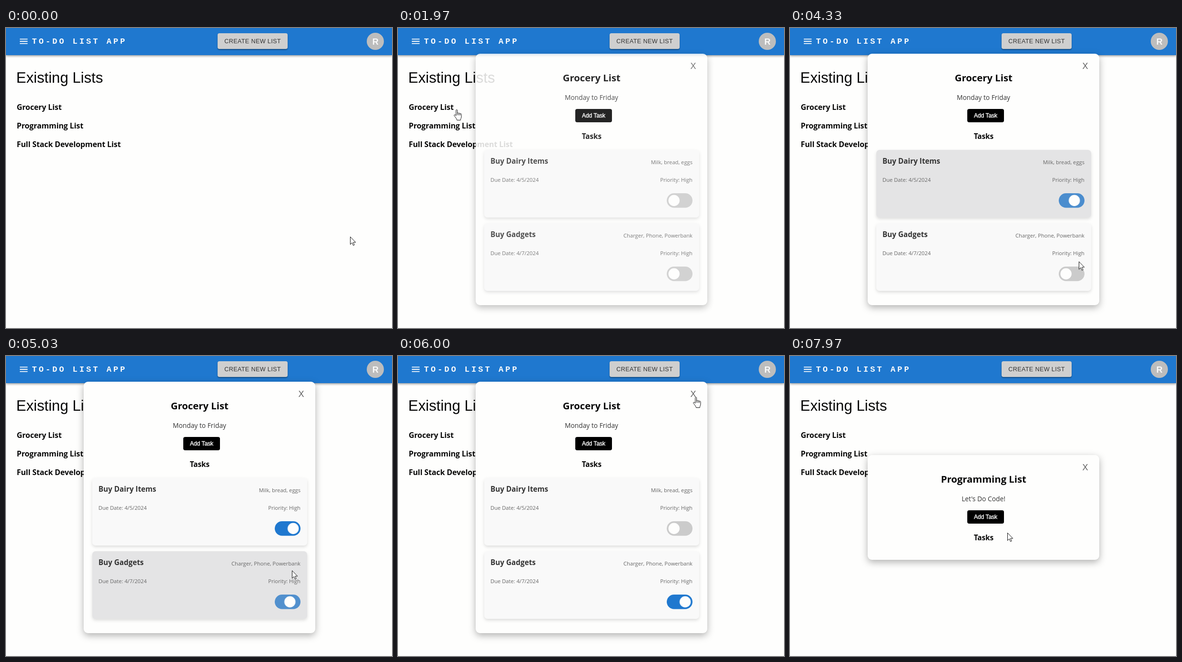
Write an HTML page that moves like this. It is 810 px wide and 630 px high and loops after 8 s.

```html
<!DOCTYPE html>
<html lang="en">
<head>
<meta charset="utf-8">
<title>To-do list app</title>
<style>
  :root { --page: #fefefd; --blue: #1f78cf; --off: #cbcbcb; --card: #f9f9f9; --hover: #e4e4e5; }
  html, body { margin: 0; width: 100%; height: 100%; overflow: hidden; background: var(--page); }
  svg { display: block; }
  text { font-family: "Open Sans", "Noto Sans", sans-serif; fill: #080808; }
  .arial { font-family: "Liberation Sans", Arial, sans-serif; }
  .brand { font: 700 17px "Liberation Mono", monospace; letter-spacing: 4.02px; fill: #fcfcfc; }
  .item { font-weight: 700; font-size: 16px; letter-spacing: -.1px; }
  .title { font-weight: 700; font-size: 20.3px; }
  .note { font-size: 13.8px; fill: #333; }
  .name { font-weight: 700; font-size: 15.3px; fill: #333; }
  .small { font-size: 11.2px; fill: #666; }
  .mid { text-anchor: middle; }
  .end { text-anchor: end; }

  .bar { fill: var(--blue); filter: drop-shadow(0 2px 2px rgba(0, 0, 0, .38)); }
  .create { fill: #cfcfcf; filter: drop-shadow(0 2px 1px rgba(0, 0, 0, .35)); }
  .panel { fill: var(--page); filter: drop-shadow(0 5px 7.5px rgba(0, 0, 0, .3)); }
  .card { fill: var(--card); filter: drop-shadow(0 3px 3px rgba(0, 0, 0, .13)); }
  .track { fill: var(--off); }
  .knob { fill: var(--page); }

  .run, .card, .track, .knob { animation: 8s linear infinite; }
  .modal1 { animation-name: modal1; }
  .modal2 { animation-name: modal2; }
  .one .card { animation-name: hover1; }
  .two .card { animation-name: hover2; }
  .one .track { animation-name: track1; }
  .two .track { animation-name: track2; }
  .one .knob { animation-name: knob1; }
  .two .knob { animation-name: knob2; }
  .cursor { animation-name: move; animation-timing-function: ease-in-out; }
  .arrow { animation-name: arrow; animation-timing-function: step-end; }
  .hand { animation-name: hand; animation-timing-function: step-end; }

  @keyframes modal1 {
    0%, 24.62% { opacity: 0; }
    24.625% { opacity: .86; }
    26.5%, 78.3% { opacity: 1; }
    81%, 100% { opacity: 0; }
  }
  @keyframes modal2 {
    0%, 92.4% { opacity: 0; }
    95.2%, 100% { opacity: 1; }
  }
  @keyframes hover1 {
    0%, 32% { fill: var(--card); }
    35.4%, 40% { fill: var(--hover); }
    43.7%, 45.6% { fill: var(--card); }
    49.4%, 54.2% { fill: var(--hover); }
    57.9%, 64.1% { fill: var(--card); }
    67.8%, 70% { fill: var(--hover); }
    73.3%, 100% { fill: var(--card); }
  }
  @keyframes hover2 {
    0%, 54.1% { fill: var(--card); }
    57.8%, 63% { fill: var(--hover); }
    66.8%, 100% { fill: var(--card); }
  }
  @keyframes track1 {
    0%, 52.87% { fill: var(--off); }
    52.875% { fill: #a6b9cc; }
    54.125% { fill: #4b8dce; animation-timing-function: ease-out; }
    57.1%, 66.5% { fill: var(--blue); animation-timing-function: ease; }
    71.5%, 100% { fill: var(--off); }
  }
  @keyframes knob1 {
    0%, 52.87% { transform: none; }
    52.875% { transform: translateX(5px); }
    54.125% { transform: translateX(17.4px); animation-timing-function: ease-out; }
    57.1%, 66.5% { transform: translateX(23.4px); animation-timing-function: ease; }
    71.5%, 100% { transform: none; }
  }
  @keyframes track2 {
    0%, 60.8% { fill: var(--off); animation-timing-function: ease; }
    65.8%, 100% { fill: var(--blue); }
  }
  @keyframes knob2 {
    0%, 60.8% { transform: none; animation-timing-function: ease; }
    65.8%, 100% { transform: translateX(23.4px); }
  }
  @keyframes move {
    0%, .35% { transform: translate(722px, 438px); }
    10.4%, 10.8% { transform: translate(74px, 108px); }
    15%, 24.62% { transform: translate(41px, 165px); }
    24.625% { transform: translate(122px, 171px); }
    28.4%, 32% { transform: translate(300px, 238px); }
    35.4%, 39.99% { transform: translate(540px, 335px); }
    40%, 41% { transform: translate(674px, 79px); }
    49.6%, 52.8% { transform: translate(596px, 371px); }
    54.125% { transform: translate(606px, 490px); animation-timing-function: ease-out; }
    56.5%, 61% { transform: translate(597px, 511px); animation-timing-function: ease-in; }
    62.875% { transform: translate(600px, 451px); animation-timing-function: ease-out; }
    65.5%, 67.3% { transform: translate(597px, 362px); }
    73.4% { transform: translate(619px, 150px); animation-timing-function: ease-out; }
    75%, 78.4% { transform: translate(624px, 86px); }
    87.5%, 92.6% { transform: translate(95px, 197px); }
    99.4%, 100% { transform: translate(456px, 371px); }
  }
  @keyframes hand {
    0%, 25.4%, 52.9%, 61.9%, 67.9%, 79%, 93.8% { visibility: hidden; }
    13.8%, 48.4%, 55.4%, 65%, 74.4%, 86.5% { visibility: visible; }
  }
  @keyframes arrow {
    0%, 25.4%, 52.9%, 61.9%, 67.9%, 79%, 93.8% { visibility: visible; }
    13.8%, 48.4%, 55.4%, 65%, 74.4%, 86.5% { visibility: hidden; }
  }
</style>
</head>
<body>
<svg width="810" height="630" viewBox="0 0 810 630">
  <defs>
    <g id="controls">
      <text class="arial mid" x="619.5" y="86" font-size="18" style="fill:#606060">X</text>
      <rect x="372" y="170" width="77" height="28" rx="4"/>
      <text class="arial mid" x="410.5" y="188" font-size="12" style="fill:#fff;stroke:#fff;stroke-width:.4">Add Task</text>
      <text class="item mid" x="406.3" y="233" style="font-size:15.4px">Tasks</text>
    </g>
  </defs>

  <rect class="bar" width="810" height="57"/>
  <path d="M29 23.4h16.3M29 28h16.3M29 32.6h16.3" stroke="#fcfcfc" stroke-width="1.8"/>
  <text class="brand" x="54.5" y="33">TO-DO LIST APP</text>
  <rect class="create" x="444" y="11" width="147" height="33" rx="4"/>
  <text class="arial" x="458.3" y="32" font-size="12.6" letter-spacing=".36" style="fill:#333">CREATE NEW LIST</text>
  <circle cx="775" cy="28" r="18" fill="#bdbdbd"/>
  <text class="arial mid" x="775.3" y="34.5" font-size="18" font-weight="700" style="fill:#fafafa">R</text>

  <text class="arial" x="21.6" y="114.5" font-size="31.2">Existing Lists</text>
  <text class="item" x="22.5" y="172">Grocery List</text>
  <text class="item" x="22.5" y="211">Programming List</text>
  <text class="item" x="22.5" y="250">Full Stack Development List</text>

  <g class="run modal1">
    <rect class="panel" x="163" y="54" width="486" height="528" rx="9"/>
    <text class="title mid" x="406.3" y="112">Grocery List</text>
    <text class="note mid" x="406" y="151">Monday to Friday</text>
    <use href="#controls"/>
    <g class="one">
      <rect class="card" x="181" y="256" width="451" height="142" rx="7"/>
      <text class="name" x="194" y="285">Buy Dairy Items</text>
      <text class="small end" x="618" y="286">Milk, bread, eggs</text>
      <text class="small" x="194" y="323">Due Date: 4/5/2024</text>
      <text class="small end" x="618" y="323">Priority: High</text>
      <rect class="track" x="564" y="347" width="54" height="30.6" rx="15.3"/>
      <circle class="knob" cx="579.2" cy="362.3" r="11.7"/>
    </g>
    <g class="two" transform="translate(0 154)">
      <rect class="card" x="181" y="256" width="451" height="142" rx="7"/>
      <text class="name" x="194" y="285">Buy Gadgets</text>
      <text class="small end" x="618" y="286">Charger, Phone, Powerbank</text>
      <text class="small" x="194" y="323">Due Date: 4/7/2024</text>
      <text class="small end" x="618" y="323">Priority: High</text>
      <rect class="track" x="564" y="347" width="54" height="30.6" rx="15.3"/>
      <circle class="knob" cx="579.2" cy="362.3" r="11.7"/>
    </g>
  </g>

  <g class="run modal2">
    <rect class="panel" x="163" y="208" width="486" height="220" rx="9"/>
    <g transform="translate(0 154)">
      <text class="title mid" x="406.3" y="112">Programming List</text>
      <text class="note mid" x="406" y="151">Let's Do Code!</text>
      <use href="#controls"/>
    </g>
  </g>

  <g class="run cursor" fill="#fff" stroke="#111" stroke-linejoin="round">
    <path class="run arrow" d="M.5.5v16l3.7-3.5 2.4 5.6 2.5-1-2.4-5.5h5z"/>
    <g class="run hand">
      <path d="M-.2 1.7C-.2.2 2.6.2 2.6 1.7V8C3.2 6.8 5.4 7 5.5 8.5 6 7.4 8.2 7.7 8.3 9.2 9 8.3 11 8.7 11 10.3V15C11 18 9.4 19 9.2 22.5H1.7C1.5 20-1.5 16.5-4 13.3-5 11.8-3.2 10.3-1.8 11.6L-.2 13.2Z"/>
      <path d="M2.6 8v4M5.5 8.5v3.8M8.3 9.2v3.3" fill="none"/>
    </g>
  </g>
</svg>
</body>
</html>
```
